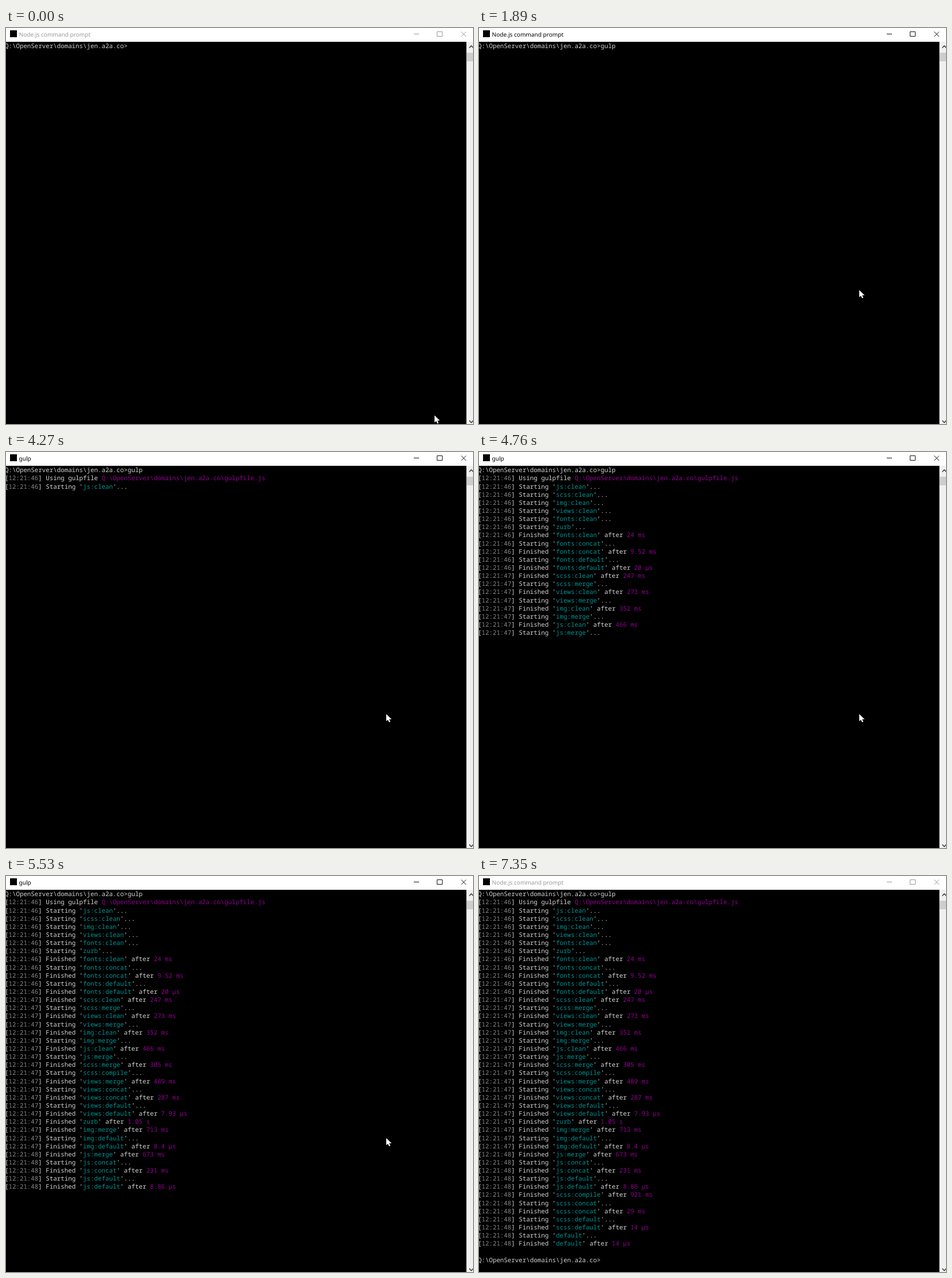
An HTML page for the animation above (7420 ms loop, 813 by 689 pixels).

```html
<!DOCTYPE html>
<html lang="en">
<head>
<meta charset="utf-8">
<title>Node.js command prompt</title>
<style>
  html, body { margin: 0; width: 100%; height: 100%; overflow: hidden; background: #000; }
  svg { display: block; }
  text { white-space: pre; text-rendering: geometricPrecision; }
  #title { font: 10.1px "Noto Sans", "Open Sans", sans-serif; }
  #rows { font: 500 10.8px "Noto Sans Mono", "DejaVu Sans Mono", monospace; fill: #d4d4d4; }
  .time { fill: #8a8a8a; }
  .task { fill: #009494; }
  .note { fill: #940094; }
</style>
</head>
<body>
<svg width="813" height="689" viewBox="0 0 813 689">
  <rect width="813" height="689"/>
  <g id="rows"></g>
  <rect id="caret" width="6.5" height="2.2" fill="#d4d4d4"/>
  <rect width="813" height="24" fill="#fff"/>
  <rect x="7" y="4" width="12" height="12"/>
  <text id="title" x="22.5" y="14.8"></text>
  <path id="buttons" d="M710 10.5h9M750.5 6.5h9v8h-9zM792.5 6.5l8.5 8.5m0-8.5l-8.5 8.5" fill="none"/>
  <rect x="801.5" y="24" width="11.5" height="665" fill="#f0f0f0"/>
  <rect x="802" y="43" width="11" height="15" fill="#cdcdcd"/>
  <path d="M806.5 34.5l3.5-3.5 3.5 3.5M806.5 683l3.5 3.5 3.5-3.5" fill="none" stroke="#444" stroke-width="1.6"/>
  <path id="mouse" d="M0 0V12.4L2.9 9.7 4.9 14.2 7 13.3 5.1 8.9H9.2z" fill="#fff"/>
</svg>
<script>
const LOOP = 7420, STEP = 70;
const CELL = 6.48, LEFT = -2, LINE = 14.14, BASE = 35.3;
const PROMPT = 'Q:\\OpenServer\\domains\\jen.a2a.co>';
const SHELL = 'Node.js command prompt';

// Moments in the session, in ms
const FOCUS = 350, ENTER = 2520, RUN = 2870, PRINT = 4270, DONE = 5670, READY = 6370, BLUR = 7350;
const KEYS = [1190, 1400, 1820, 1890];
const MOVES = [0, ...KEYS, ENTER, READY];

// Each burst prints `pace` rows per step. A task alone has started; one with a duration has finished.
const BURSTS = [
  { start: PRINT, tasks: 'js:clean' },
  { start: 4340, tasks: 'scss:clean|img:clean|views:clean|fonts:clean|zurb|fonts:clean 24 ms|' +
    'fonts:concat|fonts:concat 9.52 ms|fonts:default|fonts:default 20 µs' },
  { start: 4550, pace: 2, tasks: 'scss:clean 247 ms|scss:merge|views:clean 273 ms|views:merge|' +
    'img:clean 352 ms|img:merge|js:clean 466 ms|js:merge|scss:merge 305 ms|scss:compile' },
  { start: 5040, tasks: 'views:merge 489 ms|views:concat' },
  { start: 5250, pace: 6, tasks: 'views:concat 287 ms|views:default|views:default 7.93 µs|zurb 1.05 s|' +
    'img:merge 713 ms|img:default|img:default 8.4 µs|js:merge 673 ms|js:concat' },
  { start: 5530, tasks: 'js:concat 231 ms|js:default|js:default 8.86 µs' },
  { start: DONE, tasks: 'scss:compile 921 ms|scss:concat|scss:concat 29 ms|scss:default|' +
    'scss:default 14 µs|default|default 14 µs' },
];

const $ = id => document.getElementById(id);
const show = (el, on) => el.setAttribute('visibility', on ? 'visible' : 'hidden');
const clamp = x => Math.min(1, Math.max(0, x));
const rows = [];

function addRow(n, start, ...parts) {
  const el = document.createElementNS('http://www.w3.org/2000/svg', 'text');
  el.setAttribute('x', LEFT);
  el.setAttribute('y', BASE + n * LINE);
  for (const [text, kind] of parts) {
    const span = document.createElementNS(el.namespaceURI, 'tspan');
    span.textContent = text;
    if (kind) span.setAttribute('class', kind);
    el.append(span);
  }
  $('rows').append(el);
  rows.push({ el, start });
  return el;
}

const stamp = n => '12:21:' + (n < 13 ? 46 : n < 32 ? 47 : 48);
const head = n => [['['], [stamp(n), 'time'], ['] ']];

const command = addRow(0, 0, [PROMPT], ['']).lastChild;
addRow(1, PRINT, ...head(1), ['Using gulpfile '], [PROMPT.slice(0, -1) + '\\gulpfile.js', 'note']);
for (const { start, pace = 99, tasks } of BURSTS) {
  tasks.split('|').forEach((entry, i) => {
    const n = rows.length;
    const [task, ...spent] = entry.split(' ');
    const done = spent.length > 0;
    addRow(n, start + STEP * Math.floor(i / pace), ...head(n), [done ? "Finished '" : "Starting '"],
      [task, 'task'], [done ? "' after " : "'..."], [spent.join(' '), 'note']);
  });
}
addRow(rows.length + 1, DONE, [PROMPT]);

// The half-written row between the two steps of its burst
const partial = addRow(31, 5250, ...head(31).slice(0, 2));
rows.pop();

const blinks = t => Math.floor((t - 298) / 475);

function caretOn(t) {
  if (t >= PRINT && t < READY) return false;
  return (blinks(t) - blinks(MOVES.findLast(m => m <= t))) % 2 === 1;
}

function mouseAt(t) {
  const come = 1 - (1 - clamp(t / 280)) ** 1.5;
  const leave = clamp((t - 6300) / 210) ** 1.75;
  return [746 - 84 * come + 38 * leave, 674 - 218 * come + 185 * leave];
}

function titleAt(t) {
  if (t < ENTER || t >= DONE) return SHELL;
  return t < RUN ? SHELL + ' - gulp' : 'gulp';
}

function draw(time) {
  const t = Math.floor(time / STEP) * STEP;
  const typed = KEYS.filter(k => k <= t).length;
  command.textContent = 'gulp'.slice(0, typed);
  for (const { el, start } of rows) show(el, t >= start);
  show(partial, t === 5250);

  const active = t >= FOCUS && t < BLUR;
  $('title').textContent = titleAt(t);
  $('title').setAttribute('fill', active ? '#000' : '#999');
  $('buttons').setAttribute('stroke', active ? '#111' : '#999');

  const line = t < ENTER ? 0 : t < DONE ? 1 : 45;
  const col = line === 1 ? 0 : PROMPT.length + (line ? 0 : typed);
  $('caret').setAttribute('x', LEFT + col * CELL);
  $('caret').setAttribute('y', BASE + line * LINE);
  show($('caret'), caretOn(t));

  $('mouse').setAttribute('transform', `translate(${mouseAt(t)})`);
  show($('mouse'), t < 6580);
}

let start;
function tick(now) {
  start ??= now;
  draw(Math.max(0, now - start) % LOOP);
  requestAnimationFrame(tick);
}
draw(0);
requestAnimationFrame(tick);
</script>
</body>
</html>
```
